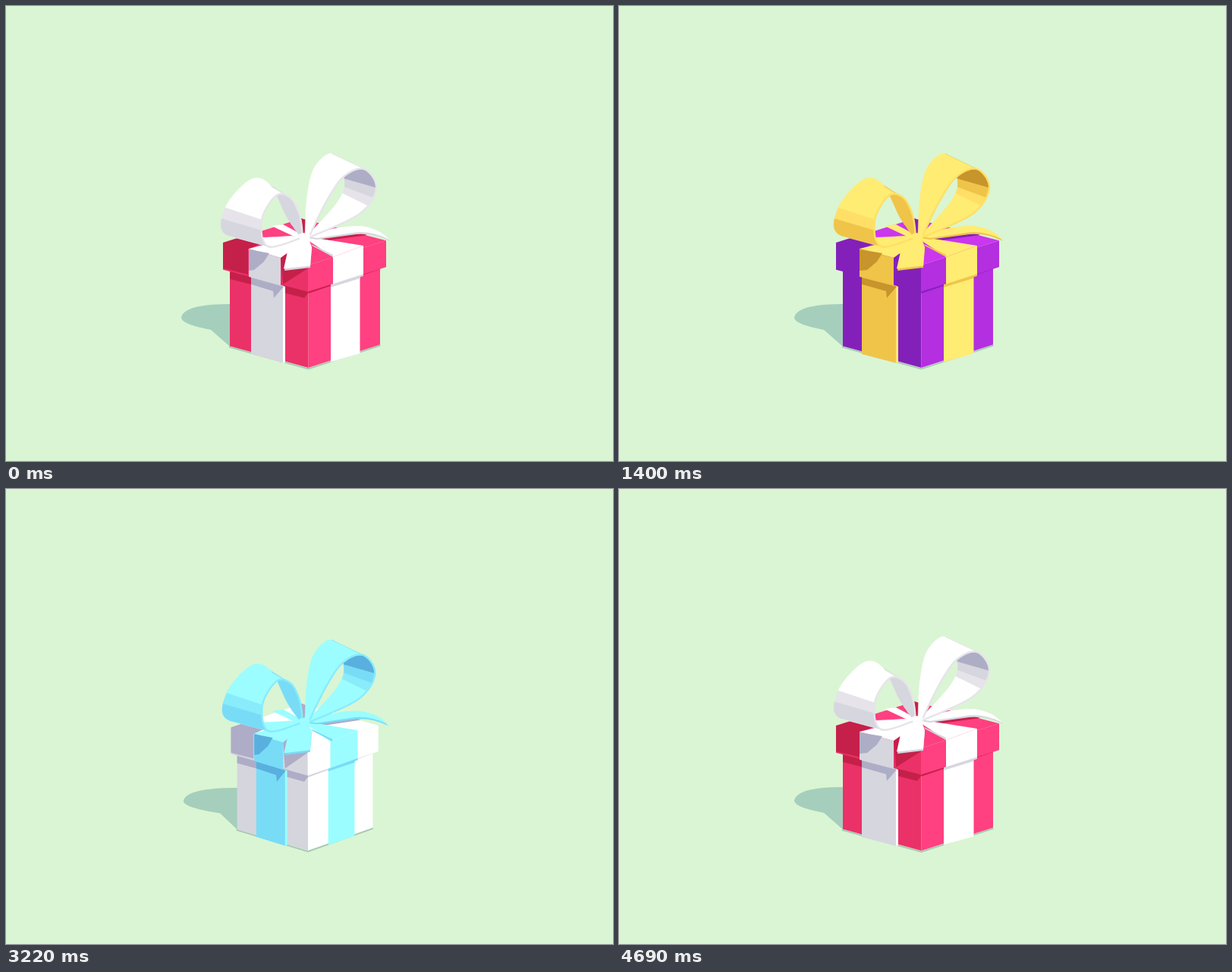
Animation, 800 px wide and 600 px high, one loop 4760 ms. Source, as an HTML page:

```html
<!DOCTYPE html>
<html lang="en">
<head>
<meta charset="utf-8">
<title>Gift boxes</title>
<style>
html, body { margin: 0; width: 100%; height: 100%; overflow: hidden; background: #daf5d3; }
svg { display: block; width: 100vw; height: 100vh; }
</style>
</head>
<body>
<svg id="stage" viewBox="0 0 800 600"></svg>
<script>
const LOOP = 4760, STEP = 70, PERIOD = LOOP / 3, GONE = 150, LANDED = 600, KNOT_DOWN = 620;
const stage = document.getElementById('stage');

// Box: top, left, right, dark. Ribbon: light, band, mid, deep.
const skins = [
  { top: '#ff4081', left: '#ea3268', right: '#ff4081', dark: '#c5204a',
    light: '#ffffff', band: '#e6e4ea', mid: '#d6d6df', deep: '#adadc6' },
  { top: '#cb36ef', left: '#8420ba', right: '#b32fdf', dark: '#8420ba',
    light: '#ffec72', band: '#ffdf65', mid: '#efc449', deep: '#c8942c' },
  { top: '#ffffff', left: '#d5d5dd', right: '#ffffff', dark: '#aeacc6',
    light: '#9bfdff', band: '#88ecfb', mid: '#78dcf7', deep: '#59b0de' }
];

// Ribbon edges at three moments: sprout, curl, closed loop.
const leftBow = {
  near: [
    [[393,303],[388,270],[379,247],[350,266],[327,290],[328,328],[389,306]],
    [[379,314],[373,282],[363,258],[345,257],[326,290],[328,328],[389,306]],
    [[391,304],[387,276],[375,253],[356,250],[337,282],[345,317],[389,306]]],
  far: [
    [[389,301],[380,268],[352,231],[315,248],[282,284],[292,318],[386,303]],
    [[376,312],[364,285],[342,247],[318,245],[282,284],[292,318],[386,303]],
    [[387,303],[371,280],[348,236],[322,229],[289,266],[293,303],[386,303]]],
  runs: [[5, 6, 'light'], [0, 2, 'mid'], [1.9, 4, 'light'], [4, 4.35, 'band'], [4.35, 5.1, 'mid']]
};
const rightBow = {
  near: [
    [[409,297],[425,262],[455,217],[488,220],[484,245],[462,285],[400,305]],
    [[405,306],[418,262],[441,231],[466,222],[484,245],[462,285],[400,305]],
    [[400,303],[422,258],[445,225],[472,215],[488,240],[466,274],[400,305]]],
  far: [
    [[403,295],[413,250],[428,211],[456,196],[448,236],[439,274],[398,302]],
    [[397,304],[404,255],[414,224],[432,208],[448,236],[439,274],[398,302]],
    [[394,302],[397,250],[407,212],[430,195],[446,228],[438,257],[398,302]]],
  runs: [[3, 4, 'deep'], [4, 4.4, 'mid'], [4.4, 4.7, 'band'], [4.7, 6, 'light'], [0, 3.02, 'light']]
};

const clamp = v => Math.max(0, Math.min(1, v));
const ramp = (v, a, b) => clamp((v - a) / (b - a));
const mix = (a, b, q) => a + (b - a) * q;
const mixPt = (p, r, q) => [mix(p[0], r[0], q), mix(p[1], r[1], q)];
const easeOut = q => 1 - (1 - q) * (1 - q);
const smooth = q => q * q * (3 - 2 * q);
const fix = v => v.toFixed(1);
const poly = (pts, fill, extra = '') =>
  `<polygon points="${pts.map(p => fix(p[0]) + ',' + fix(p[1])).join(' ')}" fill="${fill}" ${extra}/>`;
const shape = (d, fill, extra = '') => `<path d="${d}" fill="${fill}" ${extra}/>`;
const group = (transform, body) => `<g transform="${transform}">${body}</g>`;

// Linear interpolation over rows of [time, ...values].
function track(rows, t) {
  if (t <= rows[0][0]) return rows[0].slice(1);
  for (let i = 1; i < rows.length; i++) {
    if (t < rows[i][0]) {
      const q = ramp(t, rows[i - 1][0], rows[i][0]);
      return rows[i].slice(1).map((v, j) => mix(rows[i - 1][j + 1], v, q));
    }
  }
  return rows[rows.length - 1].slice(1);
}

function spline(pts, u) {
  const i = Math.min(pts.length - 2, Math.floor(u)), f = u - i;
  const at = k => pts[Math.max(0, Math.min(pts.length - 1, k))];
  return [0, 1].map(c => {
    const a = at(i - 1)[c], b = at(i)[c], d = at(i + 1)[c], e = at(i + 2)[c];
    return b + 0.5 * f * (d - a + f * (2 * a - 5 * b + 4 * d - e + f * (3 * (b - d) + e - a)));
  });
}

function pose(keys, m) {
  const i = Math.min(1, Math.floor(m));
  return keys[i].map((p, k) => mixPt(p, keys[i + 1][k], m - i));
}

function edge(pts, a, b) {
  const n = Math.max(2, Math.ceil((b - a) * 10)), out = [];
  for (let i = 0; i <= n; i++) out.push(spline(pts, mix(a, b, i / n)));
  return out;
}

function ribbon(bow, m, len, skin) {
  const near = pose(bow.near, m), far = pose(bow.far, m);
  let out = '';
  for (const [a, b, tone] of bow.runs) {
    const end = Math.min(b, len);
    if (end <= a) continue;
    const rim = edge(near, a, end), c = skin[tone];
    out += poly(rim.concat(edge(far, a, end).reverse()), c, `stroke="${c}" stroke-width=".5"`);
    const line = rim.map(p => fix(p[0]) + ',' + fix(p[1])).join(' ');
    out += `<polyline points="${line}" fill="none" stroke="${skin.band}" stroke-width="2.4" stroke-linejoin="round"/>`;
  }
  return out;
}

function groundShadow(ph, sx, sy) {
  const [y0, tx, ty, kx, ky, round] = track([
    [467, 406, 259, 417, 264, 422, 0],
    [653, 397, 246, 412, 268, 425, .6],
    [770, 398, 228, 416, 276, 432, .8],
    [1000, 393, 231, 411, 270, 427, 1]], ph);
  const X = (x, s) => 394 + (x - 394) * s, Y = y => 449 + (y - 449) * sy;
  const start = [X(296, sx), Y(y0)], tip = [X(tx, sy), Y(ty)], knee = [X(kx, sx), Y(ky)];
  const c1 = mixPt(mixPt(start, tip, .5), [tip[0] + 3, start[1]], round);
  const c2 = mixPt(mixPt(knee, tip, .5), [tip[0] + 1, tip[1] + 9 * sy], round);
  const s = p => fix(p[0]) + ' ' + fix(p[1]);
  return shape(`M${s(start)}Q${s(c1)} ${s(tip)}Q${s(c2)} ${s(knee)}L${s([X(295, sx), 449])}L${s([X(340, sx), 449])}Z`, '#a5cfbc');
}

function walls(skin) {
  return '<polyline points="294,449.5 398.5,478.5 493.5,447.5" fill="none" stroke="#a9c9b5" stroke-width="2"/>' +
    poly([[295,330],[398.5,356.5],[398.5,477],[295,448.5]], skin.left) +
    poly([[398.5,356.5],[493,327.5],[493,446.5],[398.5,477]], skin.right);
}

function inside(skin) {
  return poly([[295,330],[342.6,315.4],[350,343.4]], skin.top) +
    poly([[342.6,315.4],[389.3,300.4],[389.3,355],[350,343.4]], skin.left) +
    poly([[389.3,300.4],[462,320],[448,341.5],[398.5,356.5],[389.3,355]], skin.dark) +
    poly([[462,320],[493,327.5],[448,341.5]], skin.left);
}

function lid(d, skin) {
  const q = Math.min(1, d), g = d > 1 ? Math.max(0, 1 - (d - 1) / 1.66) : 1;
  const c = [393.5 + 37.5 * d, 311 - 84.5 * d];
  const a = mixPt([103, -32.5], [72, -23], q).map(v => v * g / 2);
  const b = mixPt([112, 29], [70, 64], q).map(v => v * g / 2);
  const h = mixPt([0, 35], [-8, 18], q).map(v => v * g);
  const at = (i, j, k) => [0, 1].map(n => c[n] + i * a[n] + j * b[n] + k * h[n]);
  const L = at(-1, -1, 0), B = at(1, -1, 0), R = at(1, 1, 0), F = at(-1, 1, 0);
  const l = at(-1, -1, 1), r = at(1, 1, 1), f = at(-1, 1, 1);
  return poly([L, F, f, l], skin.left) +
    poly([F, R, r, f], d > .3 ? skin.left : skin.right) +
    poly([L, B, R, F], skin.top) +
    (d > 0 ? `<circle cx="${fix(c[0])}" cy="${fix(c[1] - 6 * q)}" r="${fix(1.3 * g)}" fill="${skin.light}"/>` : '');
}

// A band that runs from edge a-b towards edge c-d.
const strip = (a, b, c, d, q, fill) => q > 0 ? poly([a, b, mixPt(b, c, q), mixPt(a, d, q)], fill) : '';

function wallStripes(ph, skin, pinch) {
  const q = easeOut(ramp(ph, 990, 1300)), x = 320 + pinch;
  if (!q) return '';
  return strip([x, 357], [366, 369], [366, 471], [x, 459], q, skin.mid) +
    strip([365, 369], [368, 370], [368, 470], [365, 471], q, skin.light) +
    strip([428, 367], [467.5 - pinch / 3, 356], [467.5 - pinch / 3, 458], [428, 469.5], q, skin.light) +
    poly([[x,358],[366,370],[353,385],[352,376],[x,367]], skin.deep, `opacity="${ramp(q, 0, .2)}"`) +
    poly([[428,367],[467,355],[467,359],[428,371]], skin.mid, `opacity="${ramp(q, 0, .2)}"`);
}

function lidStripes(ph, skin, pinch) {
  const top = ramp(ph, 745, 930), side = ramp(ph, 930, 990), x = 317 + pinch, r = 472 - pinch / 3;
  return strip([387,303], [394,309], [362,332], [x, 320], top, skin.light) +
    strip([396,304], [398,309], [431,331], [r, 316], top, skin.light) +
    strip([x, 320], [362,332], [362,368.5], [x, 357], side, skin.mid) +
    strip([431,331], [r, 316], [r, 355.5], [431,368.5], side, skin.light) +
    poly([[x, 321],[347,326],[340,337],[327,348],[x, 349]], skin.deep, `opacity="${side}"`) +
    strip([431,366.5], [r, 353.5], [r, 356], [431,369], side, skin.mid);
}

function castOnLid(ph, skin) {
  const on = ramp(ph, 850, 1020), early = ramp(ph, 610, 650) * (1 - ramp(ph, 830, 950));
  return shape('M389 280L376 290L392 305L398 283Z', skin.dark, `opacity="${ramp(ph, 610, 650)}"`) +
    shape('M306 306Q340 290 393 307L378 311Q345 303 328 319Z', skin.left, `opacity="${early}"`) +
    `<g opacity="${on}">` +
    poly([[286,312],[305,306],[335,314],[319,321],[319,354],[286,346]], skin.dark) +
    poly([[362,332],[366,325],[398,342],[398,346],[365,367]], skin.dark) +
    shape('M406 307L466 299L476 302L425 309Z', skin.dark) + '</g>';
}

function tails(ph, skin) {
  const q = easeOut(ramp(ph, 750, 1050));
  if (!q) return '';
  const body =
    shape('M350 290L365 288L391 302L384 306Z', skin.light) +
    shape('M389 303L343 319L364 320L393 309Z', skin.light) +
    shape('M398 306Q435 291 468 292Q494 296 506 310Q484 299 462 301L410 308Z', skin.mid) +
    shape('M398 304Q435 289 468 290Q492 293 505 308Q484 297 462 298.5L410 306Z', skin.light) +
    shape('M372 325L367 349L401 345L403 319Z', skin.mid) +
    shape('M384 307L371 324L366 346.5L401 342.5L403 318L399 307Z', skin.light) +
    shape('M399 307L403 316L431 331L431 328L402 314Z', skin.mid);
  return group(`translate(393 305) scale(${q.toFixed(3)}) translate(-393 -305)`, body);
}

function bow(ph, skin) {
  const m = ph < 770 ? smooth(ramp(ph, 653, 770)) : 1 + smooth(ramp(ph, 770, 1010));
  const len = ph < 770 ? mix(3, 5, ramp(ph, 653, 770)) : mix(5, 6, ramp(ph, 770, 960));
  return tails(ph, skin) + ribbon(leftBow, m, len, skin) + ribbon(rightBow, m, len, skin) +
    shape('M386 301Q393 297 401 302L399 309L388 309Z', skin.light);
}

function placeBow(ph, sy, leaving) {
  if (leaving) return `translate(391 ${fix(449 - 149 * sy)}) scale(${sy.toFixed(3)}) translate(-391 -300)`;
  if (ph >= KNOT_DOWN) return '';
  const d = Math.pow((KNOT_DOWN - ph) / 153, .76);
  const [s] = track([[330, 0], [467, .24], [560, .6], [KNOT_DOWN, 1]], ph);
  return `translate(${fix(393 + 77 * d)} ${fix(304 - 169 * d)}) rotate(${fix(15 * Math.min(1, d))}) ` +
    `scale(${s.toFixed(3)}) translate(-393 -304)`;
}

function render(t) {
  const turn = Math.floor(t / PERIOD), local = t - turn * PERIOD, leaving = local < GONE;
  const skin = skins[(turn + (leaving ? 0 : 1)) % 3];
  const ph = leaving ? local + PERIOD : local;
  let sx, sy;
  if (leaving) {
    sx = 1 - Math.pow(local / GONE, 2);
    sy = 1 - Math.pow(local / GONE, 3.5);
  } else {
    sx = sy = ph < 350 ? 1.14 * easeOut(ramp(ph, GONE, 350)) : mix(1.14, 1, smooth(ramp(ph, 350, 560)));
  }
  const pinch = 3 * ramp(ph, PERIOD - 70, PERIOD);
  const open = ph < LANDED;
  let box = walls(skin);
  if (open) {
    box += inside(skin);
  } else {
    box += poly([[295,347],[398.5,375],[398.5,378],[393,385],[295,360]], skin.dark) +
      poly([[398.5,375],[493,343],[493,347],[398.5,379]], skin.dark === skin.left ? skin.left : mixTone(skin)) +
      wallStripes(ph, skin, pinch) + lid(0, skin) + castOnLid(ph, skin) + lidStripes(ph, skin, pinch);
  }
  let out = '<rect width="800" height="600" fill="#daf5d3"/>' + groundShadow(ph, sx, sy) +
    group(`translate(394 449) scale(${sx.toFixed(3)} ${sy.toFixed(3)}) translate(-394 -449)`, box);
  if (open && ph > 300) out += lid(Math.pow((LANDED - ph) / 133, 1.2), skin);
  if (ph > 330) out += group(placeBow(ph, sy, leaving), bow(ph, skin));
  stage.innerHTML = out;
}

// Lid line on the bright wall: deep for the red box, soft for the white one.
function mixTone(skin) {
  return skin.top === '#ffffff' ? skin.left : skin.dark;
}

let began = null, shown = -1;
function tick(now) {
  if (began === null) began = now;
  const t = Math.floor(((now - began) % LOOP) / STEP) * STEP;
  if (t !== shown) render(shown = t);
  requestAnimationFrame(tick);
}
render(0);
requestAnimationFrame(tick);
</script>
</body>
</html>
```
